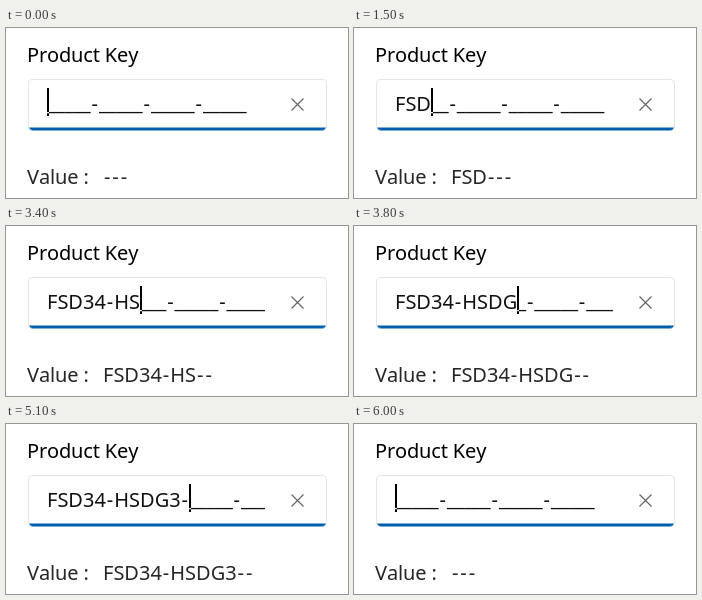
An HTML page that plays this animation: 342 px wide and 170 px high, repeating every 7000 ms.

```html
<!DOCTYPE html>
<html lang="en">
<head>
<meta charset="utf-8">
<title>Product key input</title>
<style>
  html, body { margin: 0; width: 100%; height: 100%; overflow: hidden; background: #fff; }
  .line {
    position: absolute; height: 27px; white-space: pre; color: #000;
    font: 20px/27px "Noto Sans", "Open Sans", sans-serif; font-kerning: none;
  }
  .line b { font-weight: inherit; margin: 0 .98px; }
  .line i { position: relative; top: -1px; font-style: normal; letter-spacing: -.165px; }
  #label { left: 21px; top: 13px; letter-spacing: -.16px; }
  #field {
    position: absolute; box-sizing: border-box; left: 21.5px; top: 51px; width: 299px; height: 52px;
    border: 1px solid #e5e5e5; border-bottom-color: #80aed6; border-radius: 5px; overflow: hidden;
  }
  #field::after {
    content: ""; position: absolute; left: 0; right: 0; bottom: 0; height: 3px;
    background: linear-gradient(#80aed6 1px, #005dac 1px);
  }
  #clip { position: absolute; left: 41px; top: 55px; width: 218px; height: 42px; overflow: hidden; background: #fff; }
  #key { left: 0; top: 7px; color: #111; }
  #caret { position: absolute; top: 5px; width: 2px; height: 28px; background: #fff; mix-blend-mode: difference; }
  #clear { position: absolute; left: 285px; top: 70px; }
  #caption, #value { top: 135px; color: #262626; }
  #caption { left: 21px; letter-spacing: -.1px; }
  #value { left: 97px; }
</style>
</head>
<body>
<div id="label" class="line">Product Key</div>
<div id="field"></div>
<div id="clip"><div id="key" class="line"><span id="typed"></span><span id="rest"></span></div><div id="caret"></div></div>
<svg id="clear" width="13" height="13" fill="none" stroke="#666" stroke-width="1.2"><path d="M.5 .5l12 12m0-12l-12 12"/></svg>
<div id="caption" class="line">Value :</div>
<div id="value" class="line"></div>
<script>
  const LOOP = 7000;
  const MASK = "_____-_____-_____-_____";
  const STEPS = [
    [0, ""], [1000, "F"], [1300, "FS"], [1500, "FSD"],
    [2300, "FSD3"], [2500, "FSD34"], [3000, "FSD34-H"], [3400, "FSD34-HS"],
    [3600, "FSD34-HSD"], [3800, "FSD34-HSDG"], [4000, "FSD34-HSDG3"], [4200, "FSD34-HSDG3-4"],
    [5100, "FSD34-HSDG3-"], [5600, "FSD34-HSD"], [5700, "FSD34-H"], [5800, "FSD3"], [5900, "FS"], [6000, ""]
  ];
  const byId = id => document.getElementById(id);
  const markup = text => text.replace(/_+/g, "<i>$&</i>").replace(/-/g, "<b>-</b>");

  function valueOf(typed) {
    const groups = typed.split("-");
    while (groups.length < 4) groups.push("");
    return groups.join("-");
  }

  function show(typed) {
    byId("typed").innerHTML = markup(typed);
    byId("rest").innerHTML = markup(MASK.slice(typed.length));
    byId("value").innerHTML = markup(valueOf(typed));
    const width = byId("typed").getBoundingClientRect().width;
    byId("caret").style.left = Math.round(width - 0.35) + "px";
  }

  let shown = null;
  const start = performance.now();
  function frame(now) {
    const time = Math.max(0, now - start) % LOOP;
    const typed = STEPS.findLast(step => step[0] <= time)[1];
    if (typed !== shown) show(shown = typed);
    requestAnimationFrame(frame);
  }
  frame(start);
</script>
</body>
</html>
```
